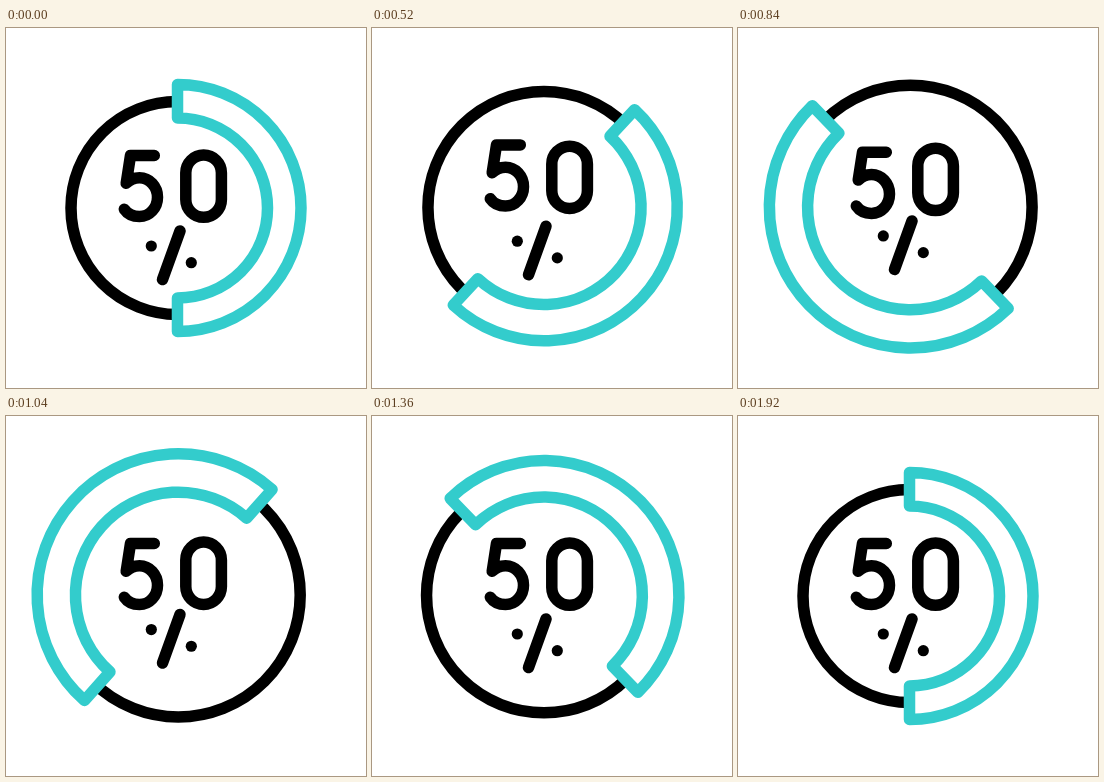
Animation of 360 by 360 pixels, one loop 2 s. Source, as an HTML page:

```html
<!DOCTYPE html>
<html lang="en">
<head>
<meta charset="utf-8">
<title>50 percent</title>
<style>
  html, body { margin: 0; width: 100%; height: 100%; overflow: hidden; background: #fff; }
  svg { display: block; width: 100vw; height: 100vh; }
  path, circle, rect { vector-effect: non-scaling-stroke; }
  .line { fill: none; stroke: #000; stroke-width: 11.5; stroke-linecap: round; stroke-linejoin: round; }
  .band { fill: #fff; stroke: #3cc; stroke-width: 11.5; stroke-linejoin: round; }
</style>
</head>
<body>
<svg viewBox="0 0 360 360">
  <g id="dial">
    <circle id="ring" class="line" r="106.5"/>
    <path id="band" class="band" d="M0 -123.5A123.5 123.5 0 0 1 0 123.5V90A90 90 0 0 0 0 -90Z"/>
  </g>
  <path id="five" class="line" d="M148.3 127.5H124.5L120.2 155.3C124 151.5 128.5 149.8 133.5 149.8A18 19.4 0 0 1 133.5 188.6C127 188.6 121.5 186 118.3 181.3"/>
  <rect id="zero" class="line" x="179.8" y="127" width="35.6" height="62.3" rx="17.8"/>
  <g id="percent">
    <path class="line" d="M174 203L156.5 251.5"/>
    <circle cx="145.3" cy="218" r="5.6"/>
    <circle cx="185.3" cy="234.7" r="5.6"/>
  </g>
</svg>
<script>
  const LOOP = 2000, STEP = 40;
  const byId = id => document.getElementById(id);
  const dial = byId('dial'), ring = byId('ring'), band = byId('band');
  // each glyph hops once, one after the other
  const hops = [['five', 535], ['zero', 645], ['percent', 775]]
    .map(([id, peak]) => ({ el: byId(id), peak }));

  const clamp = x => Math.min(1, Math.max(0, x));
  const smooth = x => x * x * (3 - 2 * x);
  const easeInOut = (x, p) => x < 0.5 ? (2 * x) ** p / 2 : 1 - (2 - 2 * x) ** p / 2;
  // rises to 1 at the peak and falls back within `half` ms on each side
  const bump = (t, peak, half) => clamp(1 - Math.abs(t - peak) / half);
  const move = (el, transform) => el.setAttribute('transform', transform);

  function draw(t) {
    const angle = 360 * easeInOut(clamp((t + 17) / 1920), 2.47);
    const ringGrow = easeInOut(bump(t, 960, 960), 3);
    const bandGrow = easeInOut(bump(t, 960, 920), 2.4);
    move(dial, `translate(${171.5 + 0.8 * bandGrow} ${180 - bandGrow})`);
    move(ring, `scale(${1 + 0.145 * ringGrow})`);
    move(band, `rotate(${angle}) scale(${1 + 0.144 * bandGrow})`);
    for (const { el, peak } of hops)
      move(el, `translate(0 ${-10.6 * smooth(bump(t, peak, 480))})`);
  }

  const start = performance.now();
  function tick() {
    const t = (performance.now() - start) % LOOP;
    draw(Math.min(1920, Math.floor(t / STEP) * STEP));
    requestAnimationFrame(tick);
  }
  tick();
</script>
</body>
</html>
```
